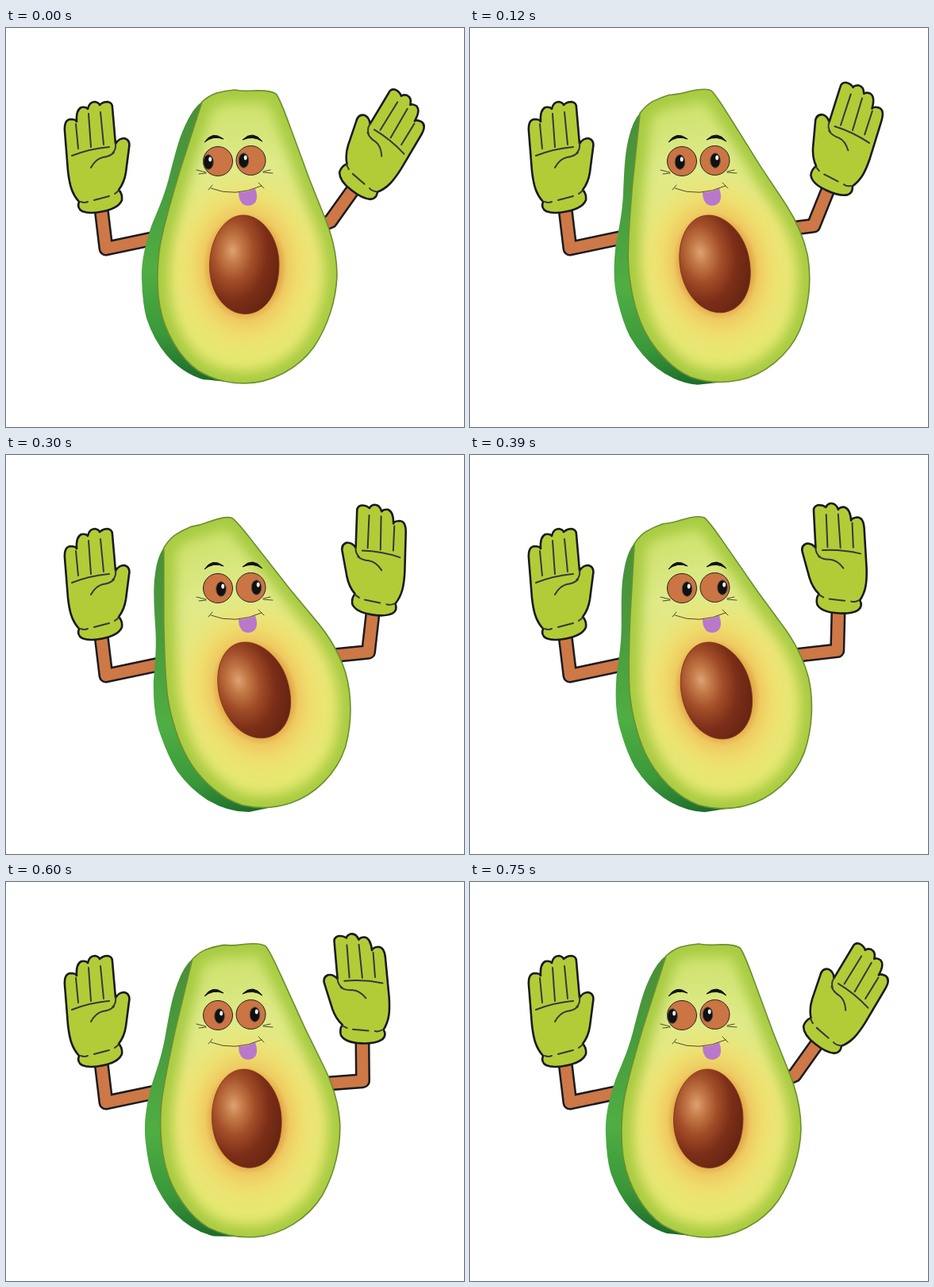
An HTML page that plays this animation: 577 by 503 pixels, repeating every 780 ms.

```html
<!DOCTYPE html>
<html lang="en">
<head>
<meta charset="utf-8">
<title>Waving avocado</title>
<style>
  html, body { margin: 0; width: 100%; height: 100%; overflow: hidden; background: #fff; }
  svg { display: block; width: 577px; height: 503px; }
  .ink { fill: none; stroke: #1a1b20; stroke-width: 2.6; stroke-linejoin: round; }
  .limb { fill: none; stroke: #1a1b20; stroke-width: 19; stroke-linecap: square; stroke-linejoin: round; }
  .skin { stroke: #cd7846; stroke-width: 14; }
  .crease { fill: none; stroke: #34383f; stroke-width: 2; stroke-linecap: round; }
  .fine { fill: none; stroke: #3a3a26; stroke-width: .9; stroke-linecap: round; }
  .eye { fill: #cb7444; stroke: #222; stroke-width: 1; }
</style>
</head>
<body>
<svg viewBox="0 0 577 503">
  <defs>
    <linearGradient id="skinFill" x1="0" y1="0" x2="0" y2="1">
      <stop offset="0" stop-color="#4a8f38"/>
      <stop offset=".3" stop-color="#489c3e"/>
      <stop offset=".6" stop-color="#4fae43"/>
      <stop offset=".83" stop-color="#3a983a"/>
      <stop offset="1" stop-color="#1b6a2a"/>
    </linearGradient>
    <linearGradient id="fleshFill" x1="0" y1="0" x2="0" y2="1">
      <stop offset="0" stop-color="#cae068"/>
      <stop offset=".25" stop-color="#dfea88"/>
      <stop offset=".5" stop-color="#ebe678"/>
      <stop offset="1" stop-color="#e5e870"/>
    </linearGradient>
    <radialGradient id="glow">
      <stop offset=".48" stop-color="#e2a648"/>
      <stop offset=".58" stop-color="#efcb62"/>
      <stop offset=".74" stop-color="#f0dc6c" stop-opacity=".85"/>
      <stop offset="1" stop-color="#efe474" stop-opacity="0"/>
    </radialGradient>
    <radialGradient id="pitFill" cx=".33" cy=".36" r=".72">
      <stop offset="0" stop-color="#dea274"/>
      <stop offset=".18" stop-color="#c47a48"/>
      <stop offset=".42" stop-color="#a24d28"/>
      <stop offset=".7" stop-color="#7c2e18"/>
      <stop offset="1" stop-color="#662512"/>
    </radialGradient>
    <filter id="soft" x="-20%" y="-20%" width="140%" height="140%"><feGaussianBlur stdDeviation="8"/></filter>
    <path id="flesh" d="M247 93Q256 85 265 82Q276 79 288 78Q299 80 311 79Q335 78 341 84C347 94 351 106 357 122
      L382 190L404 245C412 266 417 290 417 312C416 342 406 375 388 402C368 430 333 448 300 448
      C282 448 262 444 242 432C219 416 200 384 194 352C189 326 190 288 197 260C203 233 211 207 219 180Z"/>
    <clipPath id="inside"><use href="#flesh"/></clipPath>

    <path id="leftLimb" d="M120 228L126 278L202 262"/>
    <path id="rightLimb"/>
    <g id="hand">
      <path id="glove" fill="#b2cc37" d="M92 219C83 209 80 198 78 180L74 130Q73 116 81 115Q88 115 89 118
        Q88 103 95 100Q101 99 103 102Q105 93 112 93Q117 94 118 97Q122 93 128 93Q134 94 134 100L138 146
        Q142 139 149 139Q157 141 155 151L151 182Q149 195 142 204Q147 209 146 217Q142 227 123 231
        Q106 235 96 231Q89 227 92 219Z"/>
      <use href="#glove" class="ink"/>
      <path class="crease" d="M88 121L91 152M104 108L107 150M119 106L123 147M83 161Q106 152 130 150
        M138 146Q139 153 134 158M107 176Q113 165 122 163Q131 162 136 157M94 219Q99 221 103 219M111 217L130 212M137 209L142 205"/>
    </g>
    <g id="pupil">
      <ellipse rx="6.3" ry="9.3" fill="#111" stroke="#5c5450" stroke-width="1"/>
      <ellipse cx="2.2" cy="-3.6" rx="1.9" ry="3" fill="#fff"/>
    </g>
  </defs>

  <use href="#leftLimb" class="limb"/>
  <use href="#leftLimb" class="limb skin"/>
  <use href="#hand"/>
  <use href="#rightLimb" class="limb"/>
  <use href="#rightLimb" class="limb skin"/>
  <use href="#hand" id="wave"/>

  <g id="body">
    <path fill="url(#skinFill)" d="M248 92Q236 100 226 122C217 141 212 163 205 190C198 216 190 232 183 250
      C175 274 170 296 171 318Q172 348 177 366Q186 393 202 412Q222 435 248 443L278 446L300 300Z"/>
    <use href="#flesh" fill="url(#fleshFill)"/>
    <g clip-path="url(#inside)">
      <use href="#flesh" fill="none" stroke="#a6cb40" stroke-width="29" filter="url(#soft)"/>
      <ellipse cx="301" cy="301" rx="92" ry="118" fill="url(#glow)"/>
    </g>
    <use href="#flesh" fill="none" stroke="#6d8d30" stroke-width="1.6"/>
    <path fill="url(#pitFill)" stroke="#7a3418" stroke-width=".8" d="M299 236C323 236 344 265 344 298C344 335 326 360.500 301 360.500
      C276 360 256.500 334 256.500 300C256.500 266 275 236 299 236Z"/>
  </g>

  <path fill="#111" d="M250 144Q260 129 274 140Q261 135 250 144ZM298 141Q311 128 323 143Q311 135 298 141Z" stroke="#111"/>
  <circle class="eye" cx="267" cy="168" r="18.5"/>
  <circle class="eye" cx="308.500" cy="167" r="18.5"/>
  <use href="#pupil" id="left"/>
  <use href="#pupil" id="right"/>
  <path fill="#b978cb" d="M293 207Q306 207 314 202Q318 214 314 220Q308 226 300 223Q293 219 293 207Z"/>
  <path class="fine" d="M258 202Q288 214 322 199M255 204L260 198M318 195L325 202
    M240 179L252 182M243 184L252 183M324 181L333 179M324 182L336 183"/>
</svg>
<script>
  const STEP = 30, STEPS = 26;
  // step, body tilt, pupil shift, hand turn, wrist x, wrist y
  const keys = [
    [0, 0, 0, 26, 437, 204],
    [4, -11.8, 9.5, 12.5, 451, 204],
    [7, -17.3, 13, 4.5, 456, 203],
    [10, -17.8, 16, -3, 462, 200],
    [13, -14.5, 18.5, -8, 464, 198],
    [17, -7.3, 22, -11.5, 457, 200],
    [20, -4.3, 14, -10, 449, 202],
    [25, 0, 0, 26, 437, 204]
  ];
  const $ = id => document.getElementById(id);
  const place = (id, transform) => $(id).setAttribute("transform", transform);

  const slope = (i, c) => (keys[i + 1][c] - keys[i][c]) / (keys[i + 1][0] - keys[i][0]);

  // Harmonic mean of neighbouring slopes, so the curve never overshoots a key
  function tangent(i, c) {
    if (i === 0) return slope(0, c);
    if (i === keys.length - 1) return slope(i - 1, c);
    const a = slope(i - 1, c), b = slope(i, c);
    return a * b > 0 ? 2 * a * b / (a + b) : 0;
  }

  function valueAt(step, c) {
    const i = Math.max(0, keys.findIndex(k => k[0] >= step) - 1);
    const h = keys[i + 1][0] - keys[i][0], u = (step - keys[i][0]) / h, v = 1 - u;
    return v * v * ((1 + 2 * u) * keys[i][c] + u * h * tangent(i, c))
         + u * u * ((1 + 2 * v) * keys[i + 1][c] - v * h * tangent(i + 1, c));
  }

  // Forearm turns with the hand; the upper arm runs to a fixed shoulder
  function limbPath(x, y, turn) {
    const angle = turn * Math.PI / 180, cos = Math.cos(angle), sin = Math.sin(angle);
    const elbowX = x - 8 * cos - 48 * sin, elbowY = y - 8 * sin + 48 * cos;
    return `M${x} ${y}L${elbowX} ${elbowY}L380 256`;
  }

  function draw(now) {
    const step = Math.floor(now / STEP) % STEPS;
    const [tilt, look, turn, x, y] = [1, 2, 3, 4, 5].map(c => valueAt(step, c));
    place("body", `rotate(${tilt} 300 259)`);
    place("wave", `translate(${x} ${y}) rotate(${turn}) scale(-1 1) translate(-121 -230)`);
    $("rightLimb").setAttribute("d", limbPath(x, y, turn));
    place("left", `translate(${255 + look} 169)`);
    place("right", `translate(${299.5 + look} 167)`);
    requestAnimationFrame(() => draw(performance.now() - start));
  }

  const start = performance.now();
  draw(0);
</script>
</body>
</html>
```
